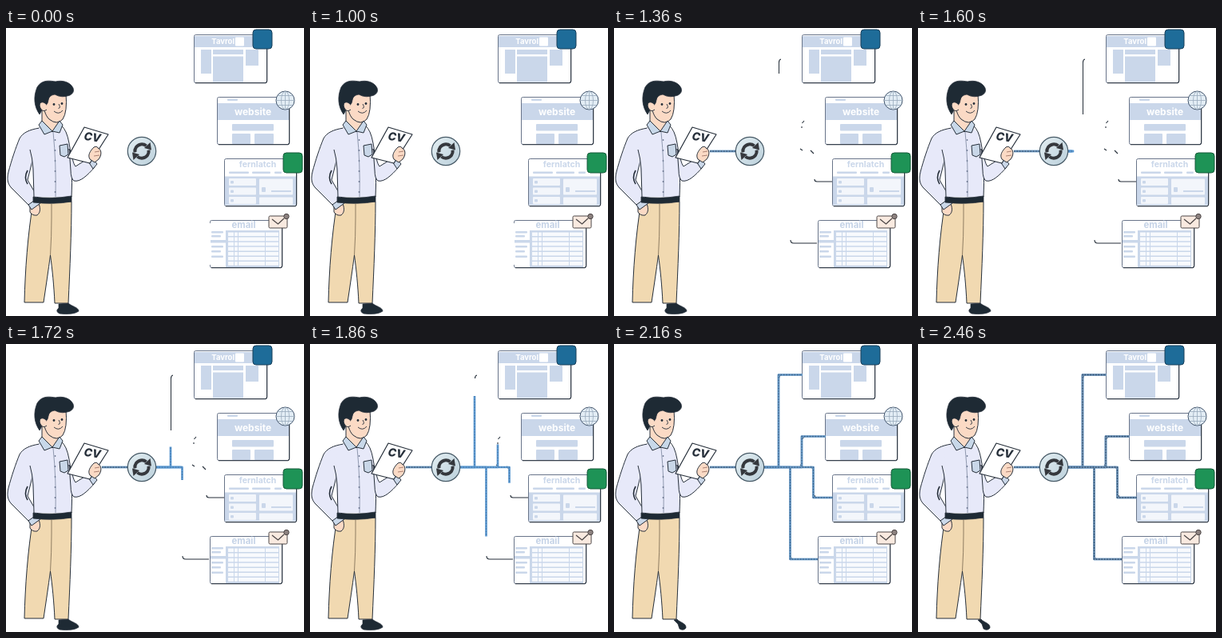
An HTML page with a canvas for the animation above (3.46 s loop, 373 px wide and 360 px high).

```html
<!DOCTYPE html>
<html lang="en">
<head>
<meta charset="utf-8">
<title>CV distribution</title>
<style>
html, body { margin: 0; width: 100%; height: 100%; overflow: hidden; background: #fff; }
canvas { display: block; width: 373px; height: 360px; }
</style>
</head>
<body>
<canvas id="stage"></canvas>
<script>
const W = 373, H = 360, LOOP = 3460, STEP = 20;
const INK = '#262f3a', DARK = '#1e2a34', PALE = '#cad7ea';
const SKIN = '#fbdac5', SHIRT = '#e7e9f9', TAN = '#f1d9b1';
const FONT = 'Inter, "Open Sans", sans-serif';
const canvas = document.getElementById('stage');
const ctx = canvas.getContext('2d');
const dpr = window.devicePixelRatio || 1;
canvas.width = W * dpr;
canvas.height = H * dpr;

const clamp = v => Math.max(0, Math.min(1, v));
const progress = (t, from, to) => clamp((t - from) / (to - from));
const ease = p => (1 - Math.cos(Math.PI * p)) / 2;

function paint(fill, stroke, width, path) {
  const args = path ? [path] : [];
  if (fill) { ctx.fillStyle = fill; ctx.fill(...args); }
  if (stroke) { ctx.strokeStyle = stroke; ctx.lineWidth = width; ctx.stroke(...args); }
}

function shape(d, fill, stroke = INK, width = 1) {
  paint(fill, stroke, width, new Path2D(d));
}

function box(x, y, w, h, fill, r = 0, stroke, width = 1) {
  ctx.beginPath();
  ctx.roundRect(x, y, w, h, r);
  paint(fill, stroke, width);
}

function disc(x, y, r, fill, stroke, width = 1) {
  ctx.beginPath();
  ctx.arc(x, y, r, 0, Math.PI * 2);
  paint(fill, stroke, width);
}

function label(text, x, y, size, color, align = 'center', style = '700') {
  ctx.font = `${style} ${size}px ${FONT}`;
  ctx.textAlign = align;
  ctx.textBaseline = 'middle';
  ctx.fillStyle = color;
  ctx.fillText(text, x, y);
}

function card(x, y, w, h) {
  box(x + .5, y + .5, w, h, '#fff', 2, '#69758a');
  shape(`M${x + 2} ${y + h + .7}H${x + w - 1}Q${x + w + .7} ${y + h} ${x + w + .7} ${y + h - 2}V${y + 5}`, null, INK, 1.1);
}

// Polyline drawn up to a share p of its length.
function trace(points, p) {
  const lengths = points.slice(1).map((b, i) => Math.hypot(b[0] - points[i][0], b[1] - points[i][1]));
  let left = p * lengths.reduce((a, b) => a + b, 0);
  ctx.beginPath();
  ctx.moveTo(...points[0]);
  for (let i = 0; i < lengths.length && left > 0; i++) {
    const k = Math.min(1, left / lengths[i]);
    const [a, b] = [points[i], points[i + 1]];
    ctx.lineTo(a[0] + (b[0] - a[0]) * k, a[1] + (b[1] - a[1]) * k);
    left -= lengths[i];
  }
}

function wire(points, p, dark) {
  if (p <= 0) return;
  trace(points, p);
  paint(null, '#5c9ad3', 2.7);
  ctx.globalAlpha = dark;
  paint(null, '#6d8cab', 2.7);
  ctx.globalAlpha = .35 + dark * .5;
  ctx.setLineDash([1.6, 1.8]);
  paint(null, '#2b4663', 1.3);
  ctx.setLineDash([]);
  ctx.globalAlpha = 1;
}

const branches = [
  [[188, 154], [206, 154], [206, 38.5], [236, 38.5]],
  [[188, 154], [235, 154], [235, 115.5], [265, 115.5]],
  [[188, 154], [249.5, 154], [249.5, 192], [274, 192]],
  [[188, 154], [220.5, 154], [220.5, 269], [255, 269]]
];

function wires(t) {
  if (t >= 1200) {
    const drop = 57 + 51 * progress(t, 1360, 1600);
    if (t < 1840) shape(`M206.5 ${drop}V42`, null);
    shape('M206.5 43Q206.5 39.5 209 39M235 125V123M235.5 119L238 116M233 151L236 153M246 153L250 157M251 189Q251 192 254 192H273M221 265Q221 269 225 269H254', null, INK, 1.1);
  }
  wire([[120, 154], [170, 154]], ease(progress(t, 1000, 1540)), .7);
  const p = ease(progress(t, 1530, 2080));
  const dark = .9 * progress(t, 1900, 2460);
  branches.forEach(b => wire(b, p, dark));
}

function jobCard() {
  card(235, 8, 91, 60);
  box(236, 10, 90, 14, PALE);
  label('Tavrol', 286, 17, 9.5, '#fff', 'right');
  box(287, 11.5, 11, 11, '#fff', 1);
  [[244, 27, 13, 30], [259, 27, 38, 6], [259, 35.5, 38, 32], [300, 27, 16, 20]]
    .forEach(r => box(...r, PALE));
  box(309, 2, 24, 24, '#1e6c99', 4, '#183e59');
}

function siteCard() {
  card(264, 86, 90, 59);
  box(277, 88.5, 13, 2.5, PALE, 1);
  box(265, 94, 89, 21, PALE);
  label('website', 309, 105, 12, '#fff');
  [[283, 120, 52, 8.5], [283, 132, 23, 13], [311, 132, 24, 13]].forEach(r => box(...r, PALE, 1));
  disc(349.5, 90.5, 11.5, '#e3edf5', '#41536a');
  ctx.beginPath();
  ctx.ellipse(349.5, 90.5, 5, 11.3, 0, 0, Math.PI * 2);
  paint(null, '#9aabbd', .8);
  shape('M338 90.5H361M340 84.5H359M340 96.5H359M349.5 79V102', null, '#9aabbd', .8);
}

function reviewCard() {
  card(273, 163, 90, 59);
  label('fernlatch', 315, 171, 10.5, PALE);
  [[279, 25], [308, 23], [336, 9]].forEach(([x, w]) => box(x, 179.5, w, 2.5, PALE, 1));
  box(274, 185.5, 89, 36, PALE);
  for (let i = 0; i < 3; i++) {
    const y = 188 + i * 11.5;
    box(279, y, 34, 9, '#f3f6fb', 1);
    box(281, y + 3, 4, 3.5, PALE, 1);
  }
  box(317, 188.5, 42, 20, '#f3f6fb', 1);
  box(320, 199, 5, 6, PALE, 1);
  box(332, 203, 25, 2, PALE);
  box(317, 211.5, 42, 9, '#f3f6fb', 1);
  box(347, 156, 24, 25, '#1e9356', 4, '#175b3a');
}

function mailCard(t) {
  card(255, 240, 90, 59);
  if (t < 1200) box(254, 244, 2, 52, '#fff');
  label('email', 297.5, 247, 11.4, '#c5d3e7');
  box(275, 253, 67, 46, PALE);
  for (let i = 0; i < 7; i++) box(278, 255.5 + i * 6.1, 63, 4.6, '#f8fafd');
  [285, 290, 324].forEach(x => box(x, 255, 1, 43, PALE));
  [254, 259, 272, 278, 284.5].forEach((y, i) => box(257, y, i % 2 ? 12 : 15, 2.6, PALE, 1));
  box(256, 265, 20, 3.5, PALE);
  box(329, 235, 23, 15, '#f9eae0', 1.5, '#4c4646');
  shape('M333 239L340.5 245L348 238', null, '#4c4646', 1.2);
  disc(351, 235.5, 3.2, '#8d8280', '#4c4646');
}

function syncBadge() {
  const g = ctx.createLinearGradient(155, 140, 186, 170);
  g.addColorStop(0, '#e0ecf0');
  g.addColorStop(1, '#bdd1dc');
  disc(170, 154, 17.7, g, '#465966', 1.2);
  for (let i = 0; i < 2; i++) {
    ctx.save();
    ctx.translate(170, 154);
    ctx.rotate(i * Math.PI);
    ctx.beginPath();
    ctx.arc(0, 0, 8.7, Math.PI * .95, Math.PI * 1.72);
    paint(null, '#35383d', 4);
    shape('M3 -4L12 -1.5L10.5 -11Z', '#35383d', null);
    ctx.restore();
  }
}

function legs(t) {
  const shoe = t < 2000
    ? 'M66 345L78 344C82 348 91 349 91 354Q84 359 67 357Q61 354 66 350Z'
    : 'M75 345L79 344C82 348 91 349 90 355Q87 359 82 356L80 350Z';
  shape(shoe, DARK, INK, .7);
  shape('M34 217H82C82 255 80 300 78 344H61C60 322 58 302 55.5 284C53 303 50 323 47 343H23C24 302 27 260 34 217Z', TAN);
  shape('M57 220V237Q57 260 55.5 284', null, '#77664f', .8);
}

function torso() {
  shape('M42 125C29 127 21 131 17 138C12 150 7 165 3 180C1 189 2 194 6 199L30 223L41 214L27 190L35 158Z', SHIRT);
  shape('M30 223L40 217C43 224 44 230 39 234Q33 235 30 230Z', SKIN);
  shape('M28 221L39 213L43 219L32 227Z', '#cbd8e9');
  shape('M45 123C55 119 69 122 75 131C82 148 83 178 82 211H35C34 184 30 157 34 136Q37 127 45 123Z', SHIRT, null);
  shape('M69 122Q76 127 79 144C83 165 83 187 82 211M35 211L34 176Q33 162 30 152', null);
  shape('M27 178Q22 187 27 195', null, INK, 1.6);
  shape('M59 130Q63 169 62 211', null, '#79849c', .8);
  for (let y = 140; y < 210; y += 13) disc(61.5, y, .9, '#69758f');
  shape('M67 147L77 145L78 158L73 161L68 159Z', '#c9d7e8');
  shape('M34 211Q58 214 82 210V217Q59 221 34 218Z', DARK, INK, .8);
}

function head() {
  shape('M45 102V119L58 130L67 119V110Z', SKIN);
  shape('M46 88C47 102 49 109 54 114Q64 122 71 114Q77 105 75 82L54 80Z', SKIN);
  shape('M42 108C35 98 34 86 39 74C45 64 55 66 62 67C70 65 80 67 84 75Q86 81 80 84Q70 88 61 83Q54 84 53 90Q52 97 48 97Z', DARK, INK, .8);
  shape('M50 95C45 90 40 94 43 100Q46 106 51 102', SKIN);
  [[60, 95.5], [70, 94.5]].forEach(([x, y]) => disc(x, y, 1.4, INK));
  shape('M66 95Q69 100 65.5 100.5M60 104Q66 109 71 103', null, INK, .9);
  shape('M45 116L58 129L48 133L41 121ZM67 116L58 129L67 131L71 121Z', '#c8d8e9');
}

function armAndPaper() {
  shape('M79 151C83 160 84 170 87 173L103 163L111 174C102 184 93 193 85 191Q81 188 81 178Z', SHIRT);
  shape('M101 164L106 160L114 170L109 176Z', '#cbd8e9');
  shape('M98 124L128 133L105 169L77 162Z', '#fff', INK, 1.2);
  ctx.save();
  ctx.translate(108, 137);
  ctx.rotate(.14);
  label('CV', 0, 0, 14, INK, 'center', 'italic 800');
  ctx.restore();
  shape('M105 164C102 159 105 154 110 149Q114 147 115 150C120 152 120 159 116 164L111 168Z', SKIN);
  shape('M111 155L117 154M110 160L117 159', null, '#986d5f', .8);
}

function draw(t) {
  ctx.setTransform(dpr, 0, 0, dpr, 0, 0);
  ctx.fillStyle = '#fff';
  ctx.fillRect(0, 0, W, H);
  ctx.lineJoin = 'round';
  jobCard();
  siteCard();
  reviewCard();
  mailCard(t);
  legs(t);
  torso();
  head();
  wires(t);
  armAndPaper();
  syncBadge();
}

const start = performance.now();
function tick() {
  const t = (performance.now() - start) % LOOP;
  draw(Math.floor(t / STEP) * STEP);
  requestAnimationFrame(tick);
}
tick();
</script>
</body>
</html>
```
